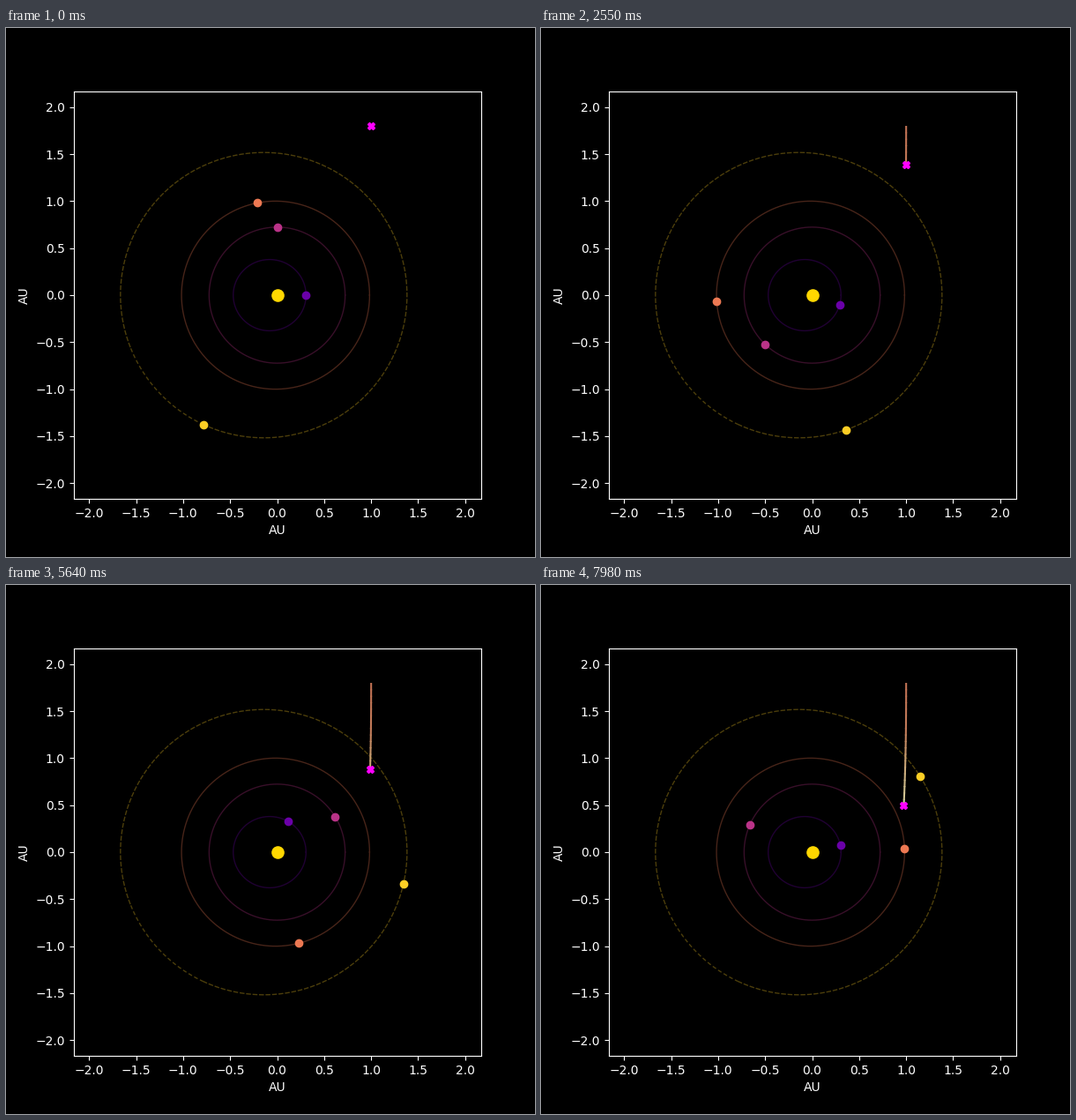
Animation of 600 by 600 pixels, one loop 8000 ms. Source, as a matplotlib script:

```python
import numpy as np
import matplotlib.pyplot as plt
from matplotlib.animation import FuncAnimation
from matplotlib.collections import LineCollection

FRAMES = 267
LOOP_MS = 8000
CHUNK = 14  # days per coloured piece of the trail

# semi-major axis (AU), eccentricity, period (days), starting angle (degrees)
PLANETS = [
    (0.3871, 0.2056, 87.97, 0.0),
    (0.7233, 0.0, 224.70, 90.0),
    (1.0000, 0.0167, 365.25, 102.0),
    (1.5237, 0.0934, 686.98, 240.3),
]


def place(a, e, angle):
    """Point of an orbit at a true anomaly given in radians."""
    r = a * (1 - e * e) / (1 + e * np.cos(angle))
    return r * np.cos(angle), r * np.sin(angle)


def planet_at(planet, day):
    a, e, period, start = planet
    squash = np.sqrt((1 - e) / (1 + e))
    ecc0 = 2 * np.arctan(squash * np.tan(np.radians(start) / 2))
    mean = ecc0 - e * np.sin(ecc0) + 2 * np.pi * day / period
    ecc = mean
    for _ in range(12):
        ecc -= (ecc - e * np.sin(ecc) - mean) / (1 - e * np.cos(ecc))
    return a * (np.cos(ecc) - e), a * np.sqrt(1 - e * e) * np.sin(ecc)


def probe_at(day):
    return 1 - 0.025 * (day / 266) ** 2.4, 1.8 - 0.0049 * day


def trail_color(day):
    stops = [0, 105, 165, 266]
    red = np.interp(day, stops, [192, 194, 198, 210])
    green = np.interp(day, stops, [112, 124, 158, 205])
    blue = np.interp(day, stops, [82, 90, 112, 155])
    return red / 255, green / 255, blue / 255


def draw_orbit(planet, color, first, last, **style):
    angle = np.radians(np.linspace(first, last, 721))
    ax.plot(*place(planet[0], planet[1], angle), color=color, alpha=0.3,
            lw=1, zorder=1, **style)


plt.style.use("dark_background")
fig, ax = plt.subplots(figsize=(6, 6), dpi=100)
ax.set_aspect("equal")
limit = 1.3 * 1.666
ax.set_xlim(-limit, limit)
ax.set_ylim(-limit, limit)
ax.set_xlabel("AU")
ax.set_ylabel("AU")

colors = plt.cm.plasma(np.linspace(0.2, 0.9, len(PLANETS)))
for planet, color in zip(PLANETS[:3], colors):
    draw_orbit(planet, color, 0, 360)
# the outer orbit is dashed, with a fainter stretch before the starting point
draw_orbit(PLANETS[3], colors[3], 240, 560, ls=(0, (4.0, 1.3)))
draw_orbit(PLANETS[3], colors[3], 200, 240, ls=(0, (3.3, 2.0)))

ax.plot(0, 0, "o", color="gold", ms=9.5, zorder=3)
trail = LineCollection([], linewidths=1.5, zorder=2)
ax.add_collection(trail, autolim=False)
dots = [ax.plot([], [], "o", color=c, ms=6, zorder=4)[0] for c in colors]
probe, = ax.plot([], [], "X", color="magenta", ms=6, zorder=5)


def update(day):
    for dot, planet in zip(dots, PLANETS):
        x, y = planet_at(planet, day)
        dot.set_data([x], [y])
    x, y = probe_at(day)
    probe.set_data([x], [y])

    # pieces overlap slightly so that no seams show
    starts = np.arange(0, day, CHUNK)
    pieces = []
    for s in starts:
        days = np.linspace(s, min(s + CHUNK + 2, day), 6)
        pieces.append(np.column_stack(probe_at(days)))
    trail.set_segments(pieces)
    trail.set_color([trail_color(s + CHUNK / 2) for s in starts])
    return [*dots, trail, probe]


anim = FuncAnimation(fig, update, frames=FRAMES, interval=LOOP_MS / FRAMES,
                     init_func=lambda: update(0), repeat=True,
                     repeat_delay=0, blit=False)
plt.show()
```
